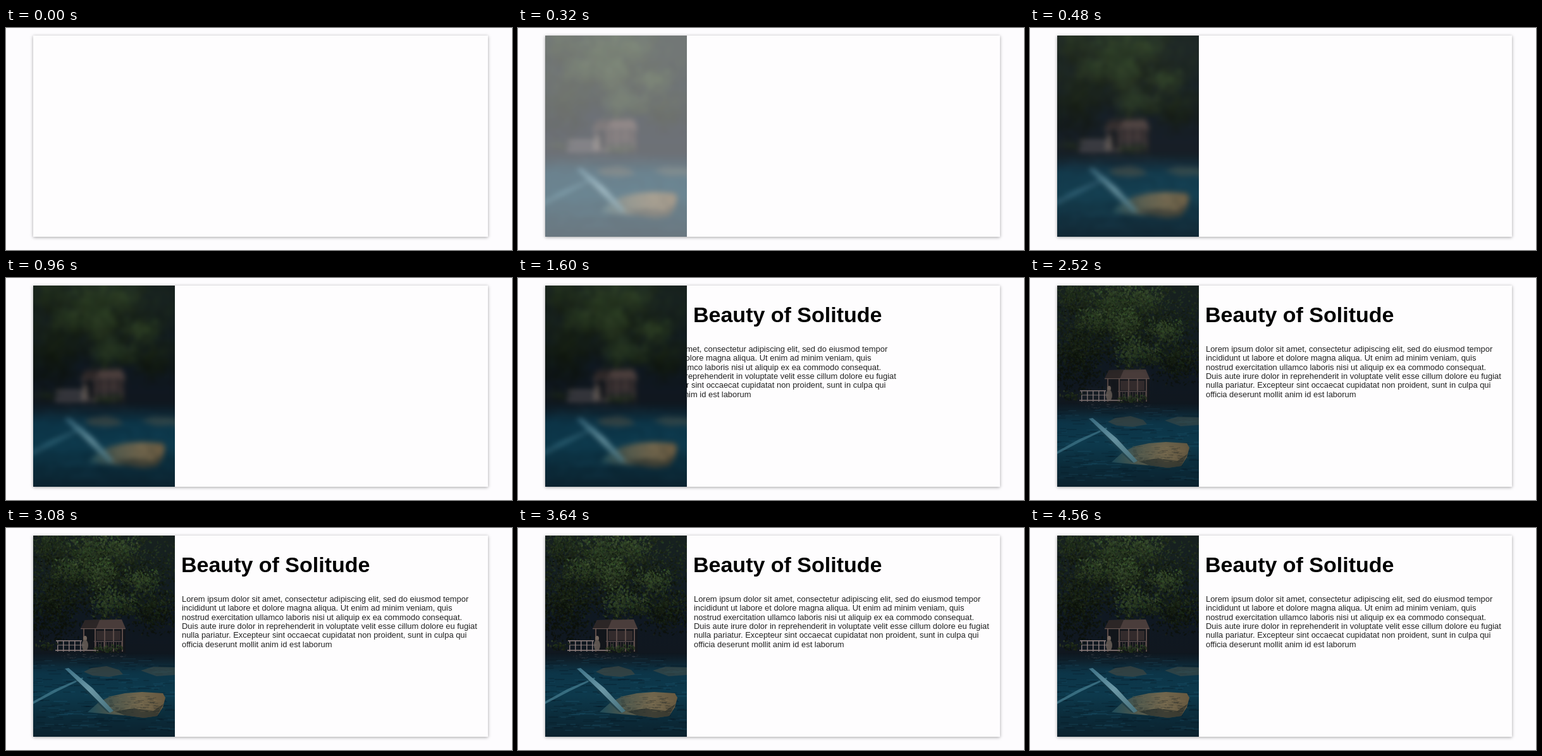
An HTML page with a canvas that plays this animation: 800 by 352 pixels, repeating every 4.6 s.

```html
<!DOCTYPE html>
<html lang="en">
<head>
<meta charset="utf-8">
<title>Beauty of Solitude</title>
<style>
  html, body { margin: 0; width: 100%; height: 100%; overflow: hidden; background: #fdfcfe; }
  .card {
    position: absolute; left: 43px; top: 12px; width: 719px; height: 319px;
    background: #fefdfe; box-shadow: 0 1px 5px rgba(0, 0, 0, .36);
  }
  .photo, .text { position: absolute; top: 0; height: 319px; overflow: hidden; }
  .photo { left: 0; width: 224px; animation: appear 4.6s infinite both; }
  .text { left: 224px; width: 495px; }
  canvas { position: absolute; left: 0; top: 0; }
  #sharp { animation: sharpen 4.6s infinite both; }
  h1, p {
    position: absolute; margin: 0; white-space: nowrap;
    font-family: "Liberation Sans", Arial, sans-serif;
  }
  h1 {
    left: 10px; top: 26px; font-size: 34px; line-height: 40px; color: #000;
    animation: slide-title 4.6s infinite both;
  }
  p {
    left: 11px; top: 93.7px; font-size: 12.93px; line-height: 14.4px; color: #222;
    animation: slide-body 4.6s infinite both;
  }
  @keyframes appear {
    0% { opacity: 0; }
    4.13% { opacity: 0; animation-timing-function: ease; }
    12.2%, 100% { opacity: 1; }
  }
  @keyframes slide-title {
    0% { transform: translateX(-480px); }
    19.4% { transform: translateX(-480px); animation-timing-function: ease; }
    30.3%, 100% { transform: none; }
  }
  @keyframes slide-body {
    0% { transform: translateX(-480px); }
    30.37% { transform: translateX(-480px); animation-timing-function: ease; }
    41.24%, 100% { transform: none; }
  }
  @keyframes sharpen {
    0% { opacity: 0; }
    41.3% { opacity: 0; animation-timing-function: ease; }
    67.4%, 100% { opacity: 1; }
  }
</style>
</head>
<body>
<div class="card">
  <div class="photo">
    <canvas id="blurred" width="224" height="319"></canvas>
    <canvas id="sharp" width="224" height="319"></canvas>
  </div>
  <div class="text">
    <h1>Beauty of Solitude</h1>
    <p>Lorem ipsum dolor sit amet, consectetur adipiscing elit, sed do eiusmod tempor<br>
incididunt ut labore et dolore magna aliqua. Ut enim ad minim veniam, quis<br>
nostrud exercitation ullamco laboris nisi ut aliquip ex ea commodo consequat.<br>
Duis aute irure dolor in reprehenderit in voluptate velit esse cillum dolore eu fugiat<br>
nulla pariatur. Excepteur sint occaecat cupidatat non proident, sunt in culpa qui<br>
officia deserunt mollit anim id est laborum</p>
  </div>
</div>
<script>
  const W = 224, H = 319, SHORE = 186;
  const sharp = document.getElementById('sharp');
  const ctx = sharp.getContext('2d');

  let seed = 11;
  const rand = () => (seed = seed * 16807 % 2147483647) / 2147483647;
  const spread = () => rand() + rand() - 1;

  function gradient(x0, y0, x1, y1, colors) {
    const g = ctx.createLinearGradient(x0, y0, x1, y1);
    colors.forEach((c, i) => g.addColorStop(i / (colors.length - 1), c));
    return g;
  }
  function rect(fill, x, y, w, h) {
    ctx.fillStyle = fill;
    ctx.fillRect(x, y, w, h);
  }
  function poly(fill, ...pts) {
    ctx.fillStyle = fill;
    ctx.beginPath();
    for (let i = 0; i < pts.length; i += 2) ctx.lineTo(pts[i], pts[i + 1]);
    ctx.fill();
  }
  function blob(fill, x, y, rx, ry, turn = 0) {
    ctx.fillStyle = fill;
    ctx.beginPath();
    ctx.ellipse(x, y, rx, ry, turn, 0, 7);
    ctx.fill();
  }

  // Leaves gathered around a centre, lighter towards the top
  function foliage(x, y, rx, ry, light) {
    const n = rx * ry * .36;
    for (let i = 0; i < n; i++) {
      const u = spread(), v = spread();
      const l = Math.max(5, light - v * 6 + spread() * 8);
      blob(`hsla(${88 + rand() * 22}, ${20 + rand() * 14}%, ${l}%, .75)`,
        x + u * rx, y + v * ry, .8 + rand() * 2.2, .6 + rand() * 1.1, rand() * 3);
    }
  }

  function drawForest() {
    rect(gradient(0, 0, 0, SHORE, ['#17211f', '#141e22', '#0f1822', '#10171f']), 0, 0, W, SHORE);
    foliage(112, 60, 125, 75, 11);
    foliage(30, 110, 50, 60, 8);
    foliage(190, 120, 45, 40, 9);
    foliage(25, 20, 38, 28, 14);
    foliage(85, 25, 36, 30, 18);
    foliage(135, 22, 36, 25, 20);
    foliage(62, 57, 34, 23, 18);
    foliage(108, 62, 28, 30, 20);
    foliage(170, 72, 34, 22, 20);
    foliage(116, 108, 27, 30, 18);
    foliage(145, 112, 24, 20, 15);
  }

  function drawHut() {
    rect('#12151a', 78, 146, 68, 40);
    poly('#4a3d3b', 82, 134, 140, 133, 146, 147, 75, 148);
    poly('#2c2626', 82, 134, 105, 134, 99, 148, 75, 148);
    rect('#685653', 75, 147, 71, 1.2);
    rect('#332b2c', 100, 151, 38, 15);
    for (const x of [79, 97, 112, 126, 140]) rect('#5c4c49', x, 148, 2, 36);
    rect('#54484a', 96, 167, 46, 1.5);
    for (let x = 99; x < 140; x += 4) rect('#40383a', x, 168, 1, 12);
    blob('#75685f', 82, 163, 3, 4);
    blob('#5d5550', 82, 174, 5, 9);
    rect('#8b7d7b', 36, 166, 41, 1.6);
    rect('#6b6160', 39, 173, 42, 1.3);
    rect('#756968', 35, 181, 68, 2);
    for (let x = 38; x < 78; x += 9) rect('#85797a', x, 166, 1.5, 18);
    foliage(115, 180, 30, 7, 16);
    foliage(20, 175, 18, 8, 12);
  }

  function drawWater() {
    rect(gradient(0, SHORE, 0, H, ['#101f2a', '#0c3548', '#0d394c', '#0b2c3b', '#0b212d']), 0, SHORE, W, H - SHORE);
    rect(gradient(0, SHORE, 0, 212, ['rgba(14,20,27,.8)', 'rgba(14,30,40,0)']), 0, SHORE, W, 26);
    for (let i = 0; i < 70; i++) {
      rect(`rgba(125, 119, 122, ${rand() * .3})`, 36 + rand() * 110, 187 + rand() * 9, 1 + rand() * 5, 1);
    }
    for (let i = 0; i < 260; i++) {
      const y = SHORE + 8 + rand() * 115;
      rect(rand() < .55 ? 'rgba(5,17,27,.28)' : 'rgba(40,112,138,.20)', rand() * W - 8, y, 5 + rand() * 20, .8 + rand() * 1.2);
    }
    poly('rgba(72,74,65,.6)', 80, 216, 92, 210, 116, 207, 136, 213, 142, 220, 120, 224, 94, 222);
    poly('rgba(65,75,70,.6)', 170, 214, 190, 208, 224, 209, 224, 221, 195, 223);
  }

  function drawRock() {
    poly(gradient(85, 0, 210, 0, ['#1d4b59', '#4e574c', '#71664d', '#66583f']),
      86, 280, 104, 264, 122, 255, 145, 250, 172, 248, 205, 250, 209, 257,
      205, 272, 196, 286, 175, 289, 145, 285, 118, 283);
    poly('rgba(20,31,34,.55)', 128, 278, 160, 274, 190, 278, 206, 267, 196, 286, 175, 289, 145, 285);
    for (let i = 0; i < 110; i++) {
      rect(rand() < .5 ? 'rgba(150,130,92,.25)' : 'rgba(24,34,36,.35)',
        118 + rand() * 80, 254 + rand() * 27, 2 + rand() * 8, 1);
    }
  }

  function drawLogs() {
    poly('rgba(78,135,154,.65)', 0, 263, 34, 244, 78, 225, 79, 227, 38, 247, 0, 267);
    poly(gradient(50, 210, 126, 280, ['#3d7085', '#6c98a6', '#47717c']),
      50, 211, 56, 210, 94, 242, 127, 278, 121, 281, 87, 247);
    poly('rgba(22,57,70,.6)', 50, 211, 87, 247, 121, 281, 117, 280, 82, 247);
  }

  drawForest();
  drawHut();
  drawWater();
  drawRock();
  drawLogs();

  const soft = document.getElementById('blurred').getContext('2d');
  soft.drawImage(sharp, 0, 0);
  soft.filter = 'blur(4px)';
  soft.drawImage(sharp, -8, -8, W + 16, H + 16);
  soft.drawImage(sharp, 0, 0);
  soft.filter = 'none';
</script>
</body>
</html>
```
